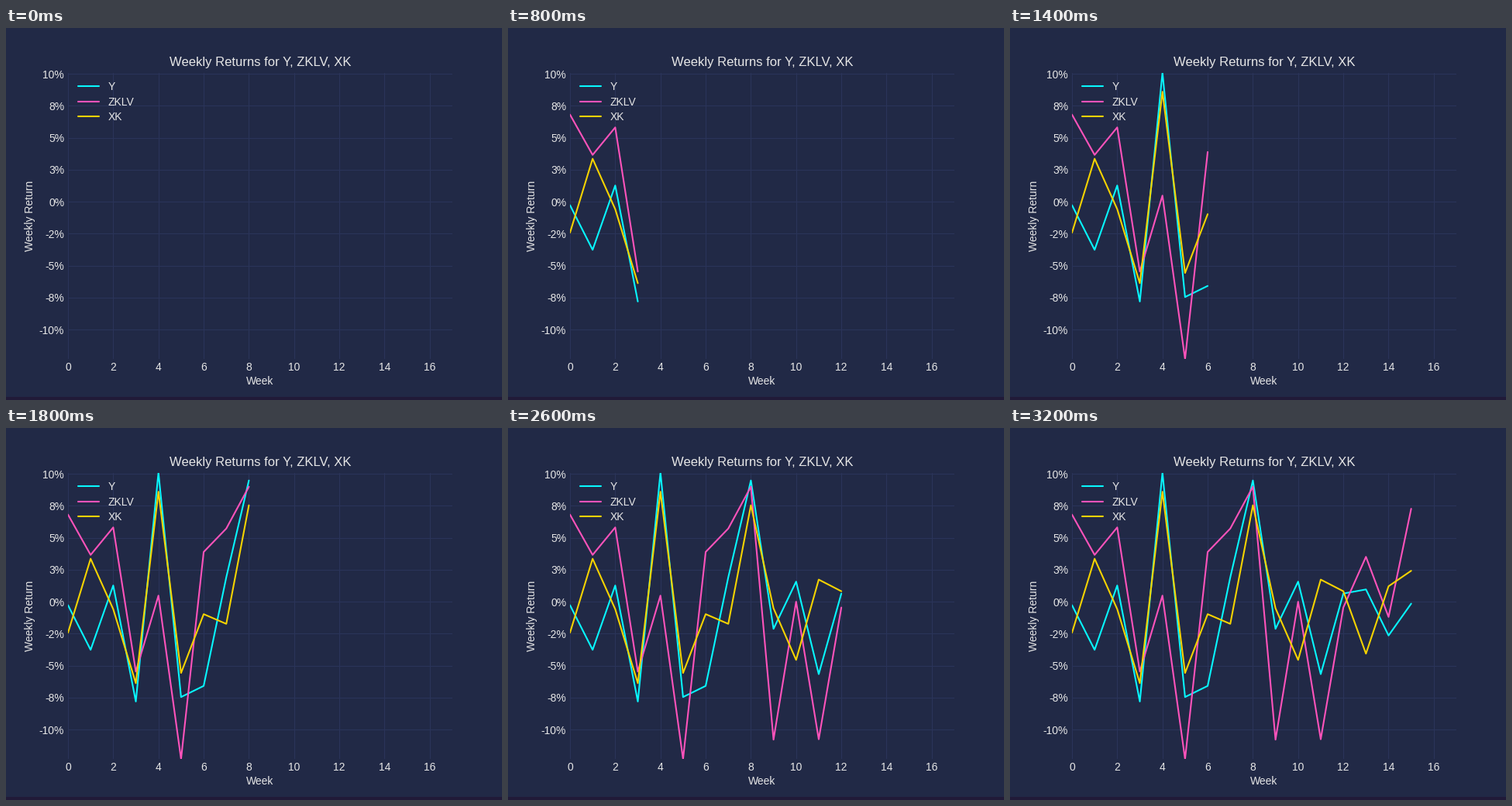
Write a matplotlib script that moves like this. It is 640x480 px and loops after 3.4 s.

```python
import matplotlib.pyplot as plt
import numpy as np
from matplotlib.animation import FuncAnimation
from matplotlib.patches import Rectangle

BG, STRIP, GRID, TEXT = "#212946", "#211a38", "#2A3459", "0.9"

plt.rcParams.update({
    "font.family": "Liberation Sans",
    "font.size": 10,
    "text.color": TEXT,
    "axes.labelcolor": TEXT,
    "xtick.color": TEXT,
    "ytick.color": TEXT,
    "xtick.major.size": 0,
    "ytick.major.size": 0,
    "xtick.major.pad": 2.8,
    "axes.facecolor": BG,
    "figure.facecolor": BG,
    "axes.axisbelow": True,
    "grid.color": GRID,
    "lines.solid_capstyle": "round",
})

# Name, colour and weekly returns in percent
STOCKS = [
    ("Y", "#08F7FE", [-0.27, -3.76, 1.27, -7.80, 10.09, -7.45, -6.58, 1.91,
                      9.48, -2.12, 1.57, -5.66, 0.64, 0.96, -2.64, -0.15]),
    ("ZKLV", "#FE53BB", [6.81, 3.66, 5.81, -5.46, 0.48, -12.30, 3.89, 5.72,
                         8.99, -10.78, 0, -10.75, -0.45, 3.51, -1.19, 7.27]),
    ("XK", "#F5D300", [-2.42, 3.36, -0.58, -6.37, 8.60, -5.57, -0.97, -1.73,
                       7.54, -0.51, -4.55, 1.73, 0.82, -4.06, 1.21, 2.42]),
]
names, colors, percents = zip(*STOCKS)
returns = np.array(percents) / 100
weeks = returns.shape[1] + 1
STEP_MS = 200

fig = plt.figure(figsize=(6.4, 4.8), dpi=100)
ax = fig.add_axes([0.125, 0.11, 0.775, 0.77])
fig.add_artist(Rectangle((0, 0), 1, 4 / 480, transform=fig.transFigure,
                         color=STRIP, lw=0))

ax.set_xlim(0, weeks)
ax.set_ylim(returns.min(), returns.max())
ax.yaxis.set_major_formatter(lambda value, _: f"{value:.0%}")
ax.grid(True)
ax.spines[:].set_visible(False)

ax.set_title("Weekly Returns for " + ", ".join(names))
ax.set_xlabel("Week", labelpad=2.9)
ax.set_ylabel("Weekly Return", labelpad=3.4)

lines = [ax.plot([], [], color=color, lw=1.5, label=name)[0]
         for name, color in zip(names, colors)]
ax.legend(loc="upper left", bbox_to_anchor=(0, 1.002),
          labelspacing=0.39, frameon=False)


def update(count):
    for line, series in zip(lines, returns):
        line.set_data(range(count), series[:count])
    return lines


anim = FuncAnimation(fig, update, frames=weeks, interval=STEP_MS,
                     init_func=lambda: update(0), repeat=True, repeat_delay=0)
plt.show()
```
